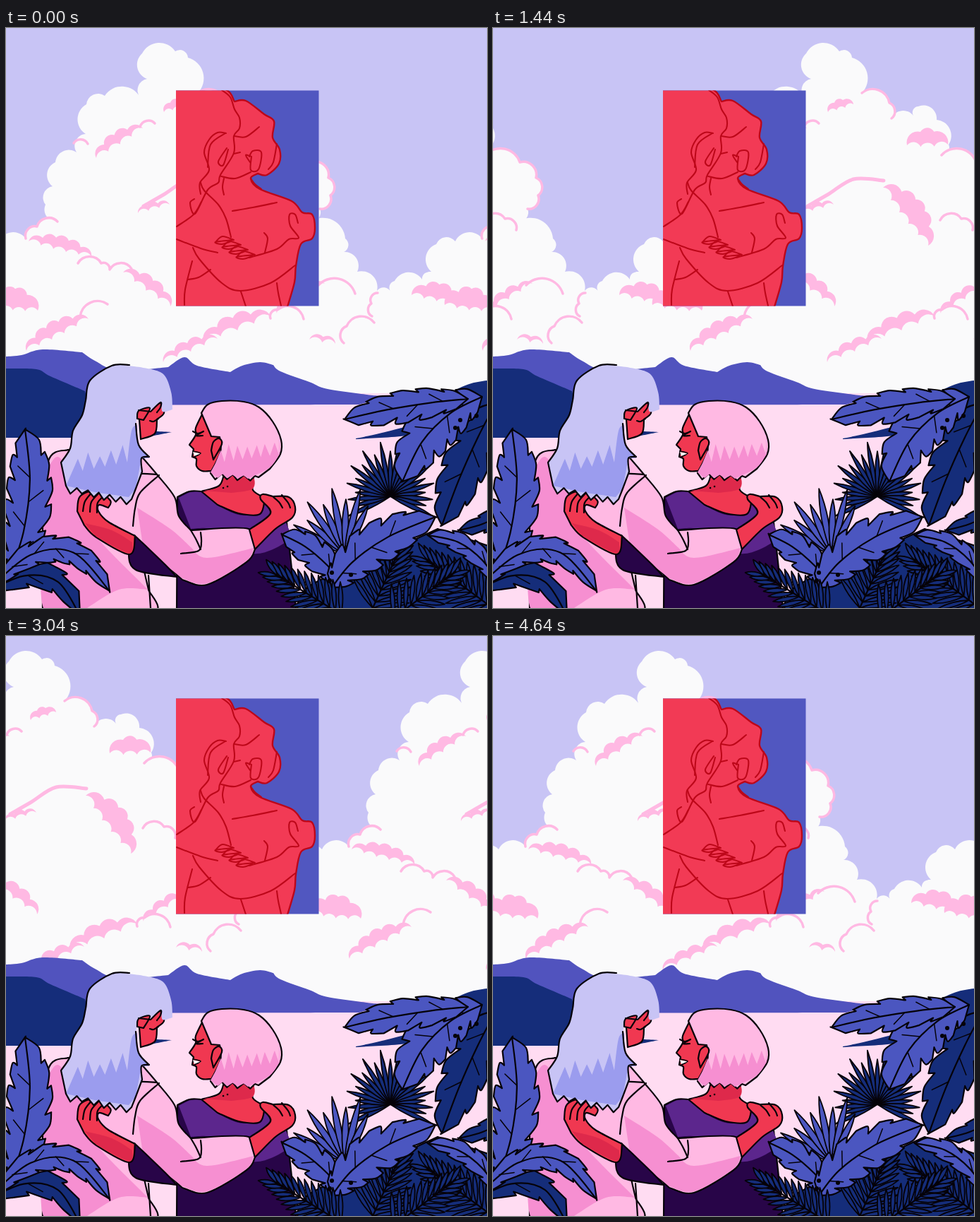
Write an HTML page that moves like this. It is 682x821 px and loops after 4720 ms.

```html
<!DOCTYPE html>
<html lang="en">
<head>
<meta charset="utf-8">
<title>Clouds over the lake</title>
<style>
html, body { margin: 0; width: 100%; height: 100%; overflow: hidden; background: #c8c4f5; }
svg { display: block; width: 100vw; height: 100vh; }
path { stroke-linecap: round; stroke-linejoin: round; }
</style>
</head>
<body>
<svg viewBox="0 0 682 821" preserveAspectRatio="none">
  <defs>
    <clipPath id="frame"><rect x="241" y="88.500" width="202.500" height="305"/></clipPath>
    <g id="cloud"></g>
  </defs>
  <rect width="682" height="821" fill="#c8c4f5"/>
  <g id="sky"><use href="#cloud"/><use href="#cloud" x="647"/><use href="#cloud" x="1294"/></g>
  <g id="card" clip-path="url(#frame)"></g>
  <g id="land"></g>
  <g id="couple"></g>
  <g id="plants"></g>
</svg>
<script>
const LOOP = 4720, STEP = 80, SPEED = 22, TILE = 647;
const WHITE = '#fafafb', PINK = '#ffb9e3', ROSE = '#f68fd1', LAKE = '#ffdcf2',
  HILL = '#5153be', NAVY = '#152d7a', LEAF = '#4b56c0', INK = '#050208',
  SKIN = '#f03851', SHADE = '#de294b', LILAC = '#c8c4f5', DUSK = '#9b9cee',
  PLUM = '#5c268d', NIGHT = '#280548', CARD = '#f23a55', CRIMSON = '#bd0719';

let seed = 7;
const random = () => (seed = seed * 16807 % 2147483647) / 2147483647;
const points = s => s.trim().split(/\s+/).map(p => p.split(',').map(Number));
const mix = (a, b, t) => a + (b - a) * t;

// Smooth curve through points; "/" marks a corner.
function curve(src) {
  let out = '', last;
  for (const part of src.split('/')) {
    const p = points(part);
    if (last) p.unshift(last); else out = 'M' + p[0];
    for (let i = 0; i < p.length - 1; i++) {
      const a = p[i - 1] || p[i], b = p[i], c = p[i + 1], d = p[i + 2] || c;
      out += `C${[0, 1].map(k => b[k] + (c[k] - a[k]) / 6)} ${[0, 1].map(k => c[k] - (d[k] - b[k]) / 6)} ${c}`;
    }
    last = p[p.length - 1];
  }
  return out;
}

// Round bumps between points; after "/" the bumps bite inwards.
function puffs(src) {
  let out = '', last;
  src.split('/').forEach((part, side) => {
    for (const p of points(part)) {
      if (!last) out = 'M' + p;
      else {
        const r = Math.hypot(p[0] - last[0], p[1] - last[1]) * 0.58;
        out += `A${r} ${r} 0 0 ${1 - side} ${p}`;
      }
      last = p;
    }
  });
  return out;
}

// Uneven teeth between two points, as corner points.
function teeth(x0, y0, x1, y1, n, h) {
  const out = [`${x0},${y0}`];
  for (let i = 1; i <= n; i++) {
    const mid = (i - .6 + random() * .2) / n;
    out.push(`${mix(x0, x1, mid)},${mix(y0, y1, mid) - h * (.7 + random() * .6)}`);
    out.push(`${mix(x0, x1, i / n)},${mix(y0, y1, i / n)}`);
  }
  return out.join(' / ');
}

let layer;
const into = id => { layer = document.getElementById(id); };
function add(d, fill, stroke = 'none', width = 0) {
  const el = document.createElementNS('http://www.w3.org/2000/svg', 'path');
  el.setAttribute('d', d);
  el.setAttribute('fill', fill);
  el.setAttribute('stroke', stroke);
  el.setAttribute('stroke-width', width);
  layer.append(el);
}
const flat = (fill, s) => add(curve(s) + 'Z', fill);
const shape = (fill, s) => add(curve(s) + 'Z', fill, INK, 2.2);
const line = (s, color = INK, w = 2.2) => add(curve(s), 'none', color, w);
const rim = s => add(puffs(s), 'none', PINK, 3.5);

// Shaded cloud fold: puffs along a bulging top, bites along the underside.
function fold(x0, y0, x1, y1, h, n) {
  const len = Math.hypot(x1 - x0, y1 - y0), top = [], low = [];
  const at = (t, k) => {
    const b = h * k * 4 * t * (1 - t) / len;
    return `${mix(x0, x1, t) + (y1 - y0) * b},${mix(y0, y1, t) - (x1 - x0) * b}`;
  };
  for (let i = 0; i <= n; i++) {
    top.push(at(i / n, .75));
    low.unshift(at(i / n, -.1));
  }
  add(puffs(top.join(' ') + '/' + low.slice(1).join(' ')) + 'Z', PINK);
}

// Broad leaf with torn edges along a bent rib.
function leaf(fill, x0, y0, cx, cy, x1, y1, w, n) {
  const at = (t, k) => {
    const u = 1 - t, x = u * u * x0 + 2 * u * t * cx + t * t * x1, y = u * u * y0 + 2 * u * t * cy + t * t * y1;
    const dx = u * (cx - x0) + t * (x1 - cx), dy = u * (cy - y0) + t * (y1 - cy);
    const v = k * w * Math.sqrt(Math.max(0, Math.sin(Math.PI * t))) / Math.hypot(dx, dy);
    return `${x - dy * v},${y + dx * v}`;
  };
  const edge = side => {
    let out = '';
    for (let i = 0; i < n; i++) {
      const end = (i + 1) / n;
      out += ` / ${at((i + .5) / n, side)} ${at(end, side * .98)}`;
      if (i < n - 1) out += ` / ${at(end - .02, side * (.6 + random() * .2))}`;
    }
    return out;
  };
  shape(fill, `${x0},${y0}${edge(1)}`  + ` ${edge(-1).split(' / ').slice(1).reverse().map(p => ' / ' + p.split(' ').reverse().join(' ')).join('')}`);
  line(`${x0},${y0} ${at(.3, 0)} ${at(.65, 0)} ${x1},${y1}`);
  for (let i = 1; i < n - 1; i++) line(`${at(i / n, 0)} ${at((i + .5) / n, i % 2 ? .6 : -.6)}`, INK, 1.5);
}

function blade(x, y, angle, len, w, fill) {
  const c = Math.cos(angle), s = Math.sin(angle);
  const at = (u, v) => `${x + c * u - s * v} ${y + s * u + c * v}`;
  add(`M${x} ${y}Q${at(len * .55, w)} ${at(len, 0)}Q${at(len * .55, -w)} ${x} ${y}Z`, fill, INK, 1.8);
}
function fan(x, y, from, to, n, len, w, fill) {
  for (let i = 0; i < n; i++) {
    const a = mix(from, to, i / (n - 1)) * Math.PI / 180;
    blade(x, y, a, len * (i % 2 ? .82 : 1) * (.75 + .25 * Math.abs(Math.sin(a))), w, fill);
  }
}
function frond(x0, y0, x1, y1, n, len, fill) {
  const a = Math.atan2(y1 - y0, x1 - x0);
  for (let i = 0; i <= n; i++) {
    const t = i / n;
    for (const side of [-1, 1])
      blade(mix(x0, x1, t), mix(y0, y1, t), a + side * (1 - .6 * t), len * (1 - .4 * t), 6, fill);
  }
  line(`${x0},${y0} ${x1},${y1}`);
}

function drawClouds() {
  into('cloud');
  add(puffs('-44,345 -37,306 -10,302 28,298 44,281 73,274 56,250 66,224 70,190 100,176 ' +
    '113,150 114,108 140,96 190,98 200,72 193,36 240,33 258,42 272,92 311,106 314,128 ' +
    '345,124 352,111 378,130 395,165 385,180 434,190 457,212 460,237 445,256 432,274 481,298 ' +
    '479,317 498,345 526,372 546,374 551,358 590,356 603,346') + 'L603 522H-48V345Z', WHITE);
  // thin edges
  ['28,298 44,281 73,274', '96,163 116,164', '272,92 311,106 314,128', '190,140 211,135',
    '385,180 434,190 457,212 460,237 445,256', '383,272 413,270 429,286',
    '102,333 135,333 147,342 178,341', '519,408 518,390 527,375', '443,364 495,376',
    '105,409 144,391', '375,411 385,399 422,412', '479,446 483,422 522,417'].forEach(rim);
  line('195,252 225,235 260,214 303,216', PINK, 5);
  // folds
  fold(128, 184, 194, 142, 18, 4);
  fold(224, 119, 260, 108, 15, 3);
  fold(336, 166, 394, 165, 28, 3);
  fold(187, 262, 232, 250, 9, 3);
  fold(302, 226, 366, 308, 36, 5);
  fold(32, 302, 121, 324, 20, 5);
  fold(166, 346, 233, 394, 20, 4);
  fold(-72, 378, 0, 390, 28, 4);
  fold(-25, 392, 45, 400, 36, 4);
  fold(384, 404, 452, 362, 13, 4);
  fold(29, 457, 117, 412, 22, 5);
  fold(223, 473, 300, 440, 15, 4);
  fold(280, 444, 375, 408, 22, 4);
  fold(430, 441, 467, 447, 9, 2);
}

function drawCard() {
  into('card');
  add('M241 88H444V395H241Z', '#5157c0');
  add(curve('230,80 306,85 324,104 / 340,103 366,122 380,132 378,155 388,172 387,192 370,208 357,206 / ' +
    '347,213 360,228 405,245 420,261 434,264 438,283 434,298 418,306 411,337 409,360 398,398 / 230,400') + 'Z', CARD, CRIMSON, 2.4);
  [
    '306,88 318,98 324,115 331,127 331,142 323,153 323,177 304,208 301,219 286,229 268,263 261,248 267,242',
    '312,149 300,148 288,158 281,176 288,201 275,219 276,235', '311,149 290,165 286,197',
    '313,170 301,189 308,194 315,172', '324,153 340,154 359,140', '323,178 332,176',
    '346,190 340,180 348,182 / 347,201 358,200 362,176 350,174 345,182', '384,164 379,190 372,200',
    '305,210 325,213 347,204', '309,213 307,225 309,236', '347,213 353,221 362,228',
    '321,259 350,254 384,247', '276,219 281,230 301,250 312,270 319,296',
    '242,281 266,264 277,246', '242,299 276,312 300,318',
    '265,311 274,327 306,361 332,372 375,361 410,336', '253,392 254,370 264,330',
    '258,356 273,353 290,342', '345,325 384,313 401,299 415,297 403,280 402,264 410,264 414,276',
    '366,290 371,298 367,318', '333,373 340,394', '384,361 386,375 390,393'
  ].forEach(s => line(s, CRIMSON, 2.1));
  for (let i = 0; i < 4; i++) {
    const x = 297 + i * 10, y = 303 + i * 7;
    line(`${x},${y} ${x + 10},${y - 8} ${x + 26},${y - 3} / ${x},${y} ${x + 9},${y + 3} ${x + 22},${y - 1}`, CRIMSON, 2.1);
  }
}

function drawLand() {
  into('land');
  add('M0 517H682V821H0Z', LAKE);
  flat(HILL, '0,465 22,463 52,455 108,459 / 126,471 160,485 230,480 / 253,466 271,478 318,487 / 335,478 360,473 379,477 / 389,486 430,501 456,511 520,520 / 535,523 500,533 / 0,534');
  flat(NAVY, '0,482 43,483 63,493 112,514 / 130,580 / 0,580');
  flat(NAVY, '195,570 235,572 / 205,578');
  flat(NAVY, '496,581 533,573 600,556 / 580,575 496,582');
  flat(NAVY, '619,529 637,513 660,503 690,498 / 690,550 620,550');
}

function drawCouple() {
  into('couple');
  shape(NIGHT, '243,664 260,656 278,656 / 300,673 330,687 360,687 / 366,664 385,675 398,700 / 412,830 / 242,830');
  flat(PLUM, '245,665 262,657 278,657 / 300,675 330,689 361,689 / 366,668 385,677 398,702 / 400,725 350,744 298,711 262,709');
  // neck
  shape(SKIN, '277,656 302,648 309,632 / 348,632 350,654 367,665 / 360,688 330,687 300,675');
  flat(SHADE, '281,655 304,649 310,632 / 347,632 350,652 320,658');
  // shirt
  shape(PINK, '88,597 60,613 52,710 / 52,830 / 205,830 202,795 / 195,750 225,760 250,781 / 285,788 341,756 353,738 / 344,709 262,711 / 245,691 239,664 214,632 190,604');
  flat(ROSE, '61,620 77,609 110,665 118,708 201,795 / 160,795 115,821 / 53,821 56,670');
  flat(ROSE, '186,679 233,709 262,735 / 285,750 351,736 / 340,755 285,786 250,779 / 222,758 196,745');
  line('180,705 183,680 190,658 217,633');
  line('178,637 190,631 214,632');
  line('262,711 269,723 276,738');
  line('276,714 277,728 273,740 248,744');
  line('202,775 205,821');
  // arm around the back
  shape(NIGHT, '182,718 174,740 184,767 242,777 / 226,760 198,733');
  shape(SKIN, '101,684 105,663 128,655 148,669 145,679 / 132,675 131,684 145,699 183,719 / 175,745 128,721 111,704');
  flat(SHADE, '112,701 150,711 179,728 / 174,743 128,720');
  for (let i = 0; i < 3; i++) line(`${109 + i * 10},${684 + i} ${112 + i * 9},${670 + i} ${122 + i * 9},${657 + i * 2}`);
  // hand on shoulder
  shape(SKIN, '345,710 375,687 361,667 364,660 378,663 / 401,664 410,678 406,693 382,709 353,738');
  for (let i = 0; i < 2; i++) line(`${378 + i * 13},${663 - i * 2} ${387 + i * 13},${671 + i} ${392 + i * 11},${679}`);
  // left head
  shape(SKIN, '188,540 222,530 / 224,545 214,554 / 211,574 191,582');
  line('204,556 209,557 216,553');
  const back = '190,480 150,478 119,499 113,527 108,548 95,570 91,595 78,615 / 85,648';
  const ends = teeth(85, 648, 178, 667, 6, -8);
  const inner = '184,652 193,628 / 192,609 203,607 / 188,590 184,560';
  flat(LILAC, `${back} / ${ends} / ${inner} / 190,541 205,543 / 219,530 222,543 236,540 / 234,515 222,489 190,480`);
  flat(DUSK, `${teeth(93, 630, 172, 615, 5, 22)} / 178,570 186,562 / 188,590 203,607 192,609 / 184,652 / 174,664 / 126,657 / 85,648`);
  line('175,477 150,478 119,499 113,527 108,548 95,570 91,595 78,615 / 85,648 / ' + ends + ' / ' + inner);
  shape(SKIN, '186,553 188,542 204,538 195,555');
  line('188,541 205,543 / 219,530 219,537 214,544');
  // right head
  shape(SKIN, '279,545 269,566 269,576 260,590 / 266,596 / 264,607 / 270,610 270,620 278,627 291,627 / 306,600 302,575');
  flat(WHITE, '265,600 276,603 267,606');
  line('265,599 276,602 267,607', INK, 1.6);
  line('265,571 272,574 280,571 / 270,577 279,577');
  const bob = `277,545 286,533 306,528 337,529 359,537 378,557 390,583 389,603 374,624 / 358,636 / ${teeth(353, 634, 290, 630, 4, -7)} / 304,600 303,579 / 291,578`;
  shape(PINK, bob);
  flat(ROSE, `388,575 / ${teeth(387, 604, 297, 616, 7, 20)} / 290,629 / ${teeth(300, 637, 343, 638, 3, 6)} / 374,622 388,603`);
  shape(SKIN, '291,598 294,586 302,581 306,589 294,611');
  add('M308 651h.1M314 649h.1', 'none', INK, 2.5);
}

function drawPlants() {
  into('plants');
  // left side
  leaf(LEAF, 5, 775, 48, 670, 27, 568, 33, 6);
  leaf(NAVY, -30, 800, 72, 735, 105, 832, 19, 3);
  leaf(LEAF, -25, 795, 80, 678, 147, 797, 19, 6);
  // right side, back to front
  leaf(NAVY, 695, 530, 650, 610, 618, 704, 32, 5);
  leaf(NAVY, 740, 660, 690, 705, 642, 711, 14, 3);
  fan(545, 663, -205, 25, 23, 78, 6, NAVY);
  leaf(LEAF, 675, 522, 592, 552, 562, 642, 35, 6);
  leaf(LEAF, 655, 525, 565, 532, 480, 554, 23, 5);
  add('M644 555h.1M667 549h.1M637 566h.1', 'none', INK, 6);
  fan(480, 745, -150, -64, 8, 95, 9, LEAF);
  // undergrowth
  shape(NAVY, '412,830 430,790 540,742 612,709 / 690,735 / 690,830');
  frond(520, 821, 555, 745, 9, 52, NAVY);
  frond(690, 821, 600, 755, 12, 50, NAVY);
  frond(550, 835, 630, 775, 10, 48, NAVY);
  leaf(LEAF, 700, 790, 665, 720, 598, 718, 15, 4);
  leaf(LEAF, 480, 790, 440, 735, 391, 717, 22, 4);
  leaf(LEAF, 462, 792, 500, 728, 609, 692, 31, 6);
  add('M462 771h.1M459 782h.1M489 774h.1', 'none', INK, 6);
  frond(475, 830, 385, 775, 11, 46, NAVY);
}

drawClouds();
drawCard();
drawLand();
drawCouple();
drawPlants();

const sky = document.getElementById('sky');
const start = performance.now();
function update(now) {
  const step = Math.floor((Math.max(0, now - start) % LOOP) / STEP);
  sky.setAttribute('transform', `translate(${-(step * SPEED % TILE)} 0)`);
  requestAnimationFrame(update);
}
update(start);
</script>
</body>
</html>
```
